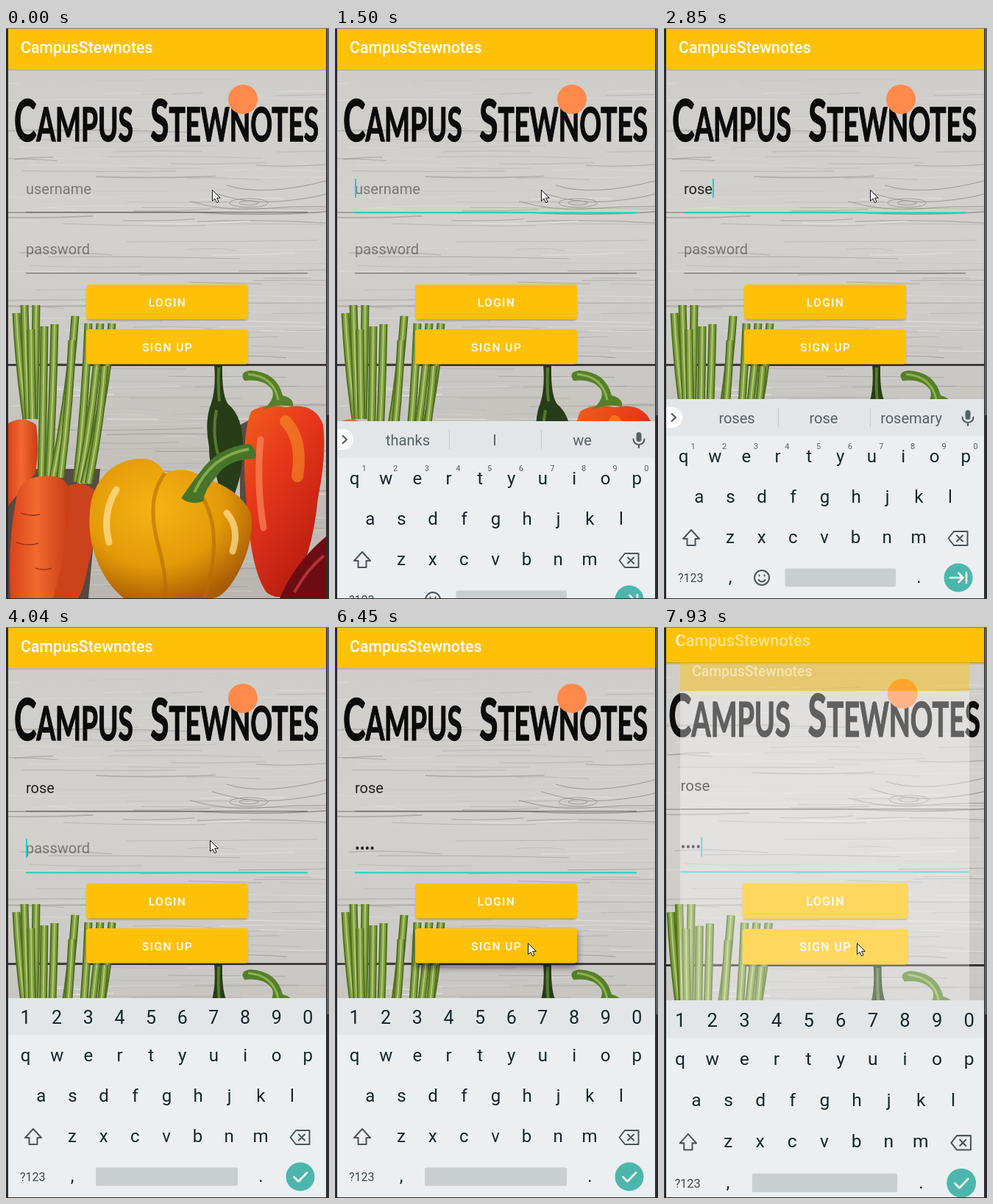
Recreate the animation shown at these times as an HTML page. Size 439 by 777 pixels, loop 8000 ms.

```html
<!DOCTYPE html>
<html lang="en">
<head>
<meta charset="utf-8">
<title>Login screen</title>
<style>
html, body { margin: 0; width: 100%; height: 100%; overflow: hidden; background: #2b2d31; }
svg { display: block; width: 439px; height: 777px; }
text { font-family: Roboto, sans-serif; white-space: pre; }
.mid { text-anchor: middle; }
.bar { font-size: 21.3px; font-weight: 500; fill: #fff; }
.logo { font: 700 37px Lato, sans-serif; stroke: #0b0b0b; stroke-width: .9; fill: #0b0b0b; }
.logo .cap { font-size: 46px; }
.field { font-size: 20px; fill: #222; }
.hint { fill: #000; fill-opacity: .42; }
.btn { font-size: 15.5px; font-weight: 500; letter-spacing: 1.4px; fill: #fff; text-anchor: middle; }
.key { font-size: 24px; fill: #14262c; text-anchor: middle; }
.digit { font-size: 25px; }
.sup { font-size: 11px; fill: #566166; text-anchor: middle; }
.word { font-size: 20px; fill: #566166; text-anchor: middle; }
.icon { fill: none; stroke: #4a555a; stroke-width: 2; stroke-linejoin: round; stroke-linecap: round; }
.go { stroke: #fff; stroke-width: 2.6; }
</style>
</head>
<body>
<svg viewBox="0 0 439 777">
  <defs>
    <clipPath id="screen"><rect x="3" y="1" width="432" height="775"/></clipPath>
    <linearGradient id="wood" x2="0" y2="1">
      <stop offset="0" stop-color="#cfcdca"/><stop offset=".3" stop-color="#d3d1ce"/>
      <stop offset=".55" stop-color="#cbc9c5"/><stop offset="1" stop-color="#b9b5b0"/>
    </linearGradient>
    <linearGradient id="carrot">
      <stop offset="0" stop-color="#d8431a"/><stop offset=".45" stop-color="#f26a30"/><stop offset="1" stop-color="#c93c14"/>
    </linearGradient>
    <radialGradient id="yellow" cx=".4" cy=".35" r=".7">
      <stop offset="0" stop-color="#f6b414"/><stop offset=".6" stop-color="#e39a08"/><stop offset="1" stop-color="#a85c04"/>
    </radialGradient>
    <linearGradient id="red" x2=".6" y2="1">
      <stop offset="0" stop-color="#f0601c"/><stop offset=".4" stop-color="#e8381a"/><stop offset="1" stop-color="#b81c10"/>
    </linearGradient>
    <filter id="soft" x="-20%" y="-60%" width="140%" height="220%"><feGaussianBlur stdDeviation="1.5"/></filter>
    <filter id="wide" x="-20%" y="-60%" width="140%" height="220%"><feGaussianBlur stdDeviation="4.5"/></filter>
  </defs>

  <rect width="439" height="777" fill="#2b2d31"/>
  <rect x="436" width="3" height="527" fill="#5b5e63"/>
  <rect width="439" height="1" fill="#77797c"/>

  <g clip-path="url(#screen)">
    <g id="win">
      <rect x="3" y="56" width="432" height="720" fill="url(#wood)"/>
      <g id="grain" fill="none"></g>
      <g fill="none" stroke="#77736e" opacity=".6">
        <path d="M250 236Q300 250 345 246T435 243M280 224Q330 240 372 236T435 226M300 214Q350 230 435 208"/>
        <ellipse cx="330" cy="238" rx="26" ry="6"/><ellipse cx="330" cy="238" rx="13" ry="3"/>
        <path d="M3 251H260Q350 256 435 250" stroke="#6a6662" stroke-width="1.3"/>
      </g>
      <path d="M3 458.5H435" stroke="#2a2624" stroke-width="2.6"/>

      <!-- vegetables -->
      <path d="M3 600H128L112 776H3ZM318 540L338 530V700L318 660Z" fill="#2c1a12" opacity=".7"/>
      <path d="M3 538Q24 526 41 540Q46 570 40 606L3 650Z" fill="url(#carrot)"/>
      <path d="M82 624Q104 614 122 630Q124 690 112 730Q106 764 98 776H60Q86 700 82 624Z" fill="#cc421b"/>
      <g id="stems" fill="none" stroke-linecap="butt"></g>
      <path d="M14 640Q18 612 48 610Q80 606 86 628Q86 700 64 776H6Q2 700 14 640Z" fill="url(#carrot)"/>
      <path d="M20 660q14 5 26 2M14 700q16 6 30 1M40 735q12 4 22 0" fill="none" stroke="#a9320f" stroke-width="1.5"/>

      <path d="M283 458H294Q293 500 302 512Q322 528 322 570Q322 610 308 640Q292 640 286 610Q276 600 276 570Q270 540 277 516Q286 494 283 458Z" fill="#263d17"/>
      <path d="M286 520Q280 550 288 580M289 462Q288 490 290 508" fill="none" stroke="#57792f" stroke-width="4"/>

      <path d="M333 522Q350 510 380 516Q420 508 431 540Q436 580 424 640Q416 720 388 765Q374 782 354 768Q334 740 328 660Q318 560 333 522Z" fill="url(#red)"/>
      <path d="M346 560Q340 620 350 680" fill="none" stroke="#f9875a" stroke-width="9" stroke-linecap="round" opacity=".7"/>
      <path d="M380 535Q404 560 396 610" fill="none" stroke="#f79a28" stroke-width="16" stroke-linecap="round" opacity=".55"/>
      <path d="M350 519Q366 505 362 493Q352 477 324 480Q316 468 332 466Q368 468 376 500Q392 504 390 515Q370 511 350 519Z" fill="#55802a"/>
      <path d="M329 471Q364 474 370 506" fill="none" stroke="#8fb04d" stroke-width="3"/>
      <path d="M372 776Q392 728 435 692V776Z" fill="#6d0d12"/>
      <path d="M392 768Q408 738 432 718" fill="none" stroke="#b0343a" stroke-width="4"/>

      <path d="M216 606Q244 594 268 612Q316 626 333 660Q338 700 314 744Q296 776 280 776H160Q128 750 116 700Q108 650 124 622Q146 584 190 586Q208 590 216 606Z" fill="url(#yellow)"/>
      <path d="M216 606Q190 640 206 700T214 776M268 640Q296 690 270 776" fill="none" stroke="#b56c05" stroke-width="5" opacity=".6"/>
      <path d="M150 628Q130 660 140 700M300 660Q318 680 308 712" fill="none" stroke="#ffe49a" stroke-width="9" stroke-linecap="round" opacity=".7"/>
      <path d="M238 640Q250 622 264 604Q288 570 330 566Q342 572 339 586Q302 586 286 610Q270 628 268 644Q252 650 238 640Z" fill="#48742a"/>
      <path d="M256 632Q278 582 330 573" fill="none" stroke="#86a94a" stroke-width="4"/>

      <rect x="3" width="432" height="56" fill="#ffc107"/>
      <rect x="3" y="56" width="432" height="2" fill="#000" opacity=".12"/>
      <text class="bar" x="20" y="34">CampusStewnotes</text>
      <g class="logo" transform="translate(0 154) scale(1 1.72)">
        <text class="logo" x="11"><tspan class="cap">C</tspan>AMPUS</text>
        <text class="logo" x="425" text-anchor="end"><tspan class="cap">S</tspan>TEWNOTES</text>
      </g>
      <circle cx="322" cy="97" r="20" fill="#ff8a4c"/>

      <rect id="line0" x="27" width="383"/>
      <rect id="line1" x="27" width="383"/>
      <text id="user" class="field" x="27" y="226"></text>
      <text id="pass" class="field" x="27" y="308"></text>
      <rect id="caret" width="2" height="26" fill="#10d5c0"/>

      <rect x="110" y="351" width="218" height="47" rx="4" opacity=".3" filter="url(#soft)"/>
      <rect x="110" y="412" width="218" height="47" rx="4" opacity=".3" filter="url(#soft)"/>
      <rect id="press" x="108" y="415" width="222" height="49" rx="5" filter="url(#wide)"/>
      <rect x="109" y="349" width="220" height="47.500" rx="4" fill="#ffc107"/>
      <rect x="109" y="410" width="220" height="47.500" rx="4" fill="#ffc107"/>
      <text class="btn" x="219.500" y="379">LOGIN</text>
      <text class="btn" x="219.500" y="439.500">SIGN UP</text>
    </g>

    <g id="veil">
      <rect x="22" width="393" height="87" fill="#ffc107" opacity=".47"/>
      <rect x="22" y="87" width="393" height="689" fill="#fff" opacity=".35"/>
      <text class="bar" style="font-size:19.4px" x="38" y="67" opacity=".5">CampusStewnotes</text>
    </g>

    <g id="kb">
      <rect x="3" y="505" width="432" height="272" fill="#eceff1"/>
      <rect x="3" y="505" width="432" height="50" fill="#e3e6e9"/>
      <g id="keys"></g>
      <g id="textMode">
        <path d="M3 516H11A14 14 0 0 1 11 544H3Z" fill="#fff"/>
        <path class="icon" d="M10.500 525L16 530L10.500 535"/>
        <path d="M155.500 517V543M280.500 517V543" stroke="#c3c8cb"/>
        <rect x="409.500" y="520" width="7" height="13" rx="3.500" fill="#566166"/>
        <path class="icon" d="M405.500 529.500A7.500 7.500 0 0 0 420.500 529.500M413 537V541"/>
        <circle class="icon" cx="133" cy="748" r="10"/>
        <path class="icon" d="M128.500 751Q133 756 137.500 751M129.500 744.500V745.500M136.500 744.500V745.500"/>
      </g>
      <g id="digitMode"></g>
      <rect id="space" y="735.500" height="25" rx="2" fill="#c9ced1"/>
      <path class="icon" d="M37 683L48 695H42.500V704H31.500V695H26Z"/>
      <path class="icon" d="M386.500 694.500L394 685H412.500V704H394ZM398 690.500L406 698.500M406 690.500L398 698.500"/>
      <text x="19" y="754" font-size="16" fill="#3d494e">?123</text>
      <circle cx="400" cy="748" r="19.500" fill="#4db6ac"/>
      <path class="icon go" id="go"/>
    </g>
  </g>
  <path id="mouse" d="M.5 .5V15.500L4 12.300L6.500 17.700L9 16.500L6.600 11.300H11.300Z" fill="#fff" stroke="#111"/>
</svg>

<script>
const LOOP = 8000, TEAL = '#1fd3bf';
const $ = id => document.getElementById(id);

function add(parent, tag, attrs, label) {
  const el = document.createElementNS('http://www.w3.org/2000/svg', tag);
  for (const k in attrs) el.setAttribute(k, attrs[k]);
  if (label) el.textContent = label;
  return parent.appendChild(el);
}
function set(id, attrs) {
  for (const k in attrs) $(id).setAttribute(k, attrs[k]);
}
const show = (id, on) => set(id, { visibility: on ? 'visible' : 'hidden' });

// wood grain
let seed = 11;
const rnd = () => (seed = seed * 16807 % 2147483647) / 2147483647;
for (let i = 0; i < 190; i++) {
  const x = rnd() * 420 - 40, y = 62 + rnd() * 710, len = 50 + rnd() * 220;
  add($('grain'), 'path', {
    d: `M${x} ${y}q${len / 2} ${rnd() * 8 - 4} ${len} ${rnd() * 6 - 3}`,
    stroke: rnd() < .55 ? '#85817c' : '#f1f0ee',
    'stroke-width': .5 + rnd() * 1.3, opacity: .15 + rnd() * .35
  });
}

// carrot tops: top point, foot point
const stems = [
  [14, 388, 28, 532], [25, 377, 31, 532], [41, 377, 38, 532], [34, 410, 36, 532],
  [112, 402, 96, 618], [128, 402, 100, 620], [144, 402, 106, 620], [134, 460, 112, 620],
  [52, 406, 48, 612], [66, 403, 58, 612], [94, 392, 64, 612], [90, 425, 74, 612]
];
for (const [x, y, fx, fy] of stems) {
  const d = `M${x} ${y}Q${x * .75 + fx * .25} ${(y + fy) / 2} ${fx} ${fy}`;
  add($('stems'), 'path', { d, stroke: '#4f6f22', 'stroke-width': 11 });
  add($('stems'), 'path', { d, stroke: '#7f9f3c', 'stroke-width': 7 });
  add($('stems'), 'path', { d, stroke: '#b3c878', 'stroke-width': 2 });
}

// keyboard
const PITCH = 42.65;
function keyRow(chars, x, y, parent = $('keys'), cls = 'key') {
  [...chars].forEach((c, i) => add(parent, 'text', { class: cls, x: x + i * PITCH, y }, c));
}
keyRow('qwertyuiop', 26.5, 591);
keyRow('asdfghjkl', 47.8, 646);
keyRow('zxcvbnm', 90, 701);
keyRow(',', 90, 755);
keyRow('.', 346.5, 755);
keyRow('1234567890', 39.5, 573, $('textMode'), 'sup');
keyRow('1234567890', 26.5, 540, $('digitMode'), 'key digit');
const words = [99, 217, 336].map(x => add($('textMode'), 'text', { class: 'word', x, y: 538 }));

// each track: [time, value], held until the next entry
const tracks = {
  user: [[0, ''], [2480, 'ro'], [2730, 'ros'], [2850, 'rose']],
  pass: [[0, ''], [4580, 'r'], [4700, '•o'], [4850, '••s'], [5000, '•••e'], [6450, '••••']],
  focus: [[0, -1], [1200, 0], [3790, 1]],
  caret: [[0, 0], [1200, 1], [1770, 0], [2330, 1], [3380, 0], [3790, 1], [5520, 0],
          [6060, 1], [6450, 0], [6970, 1], [7380, 0], [7930, 1]],
  rise: [[0, 999], [1500, 30], [1650, 0]],
  digits: [[0, false], [3920, true]],
  words: [[0, 'thanks I we'], [2480, 'road room rock'], [2730, 'rose rosy roses'], [2850, 'roses rose rosemary']],
  press: [[0, 0], [6210, .2], [6330, .4], [6600, .2], [6720, 0]],
  zoom: [[0, 1], [7930, 1.023]],
  mouse: [[0, [280, 220]], [3520, [279, 250]], [3650, [278, 283]], [3790, [277, 290]],
          [5400, [275, 350]], [5520, [270, 409]], [5670, [268, 423]], [5790, [266, 431]],
          [5940, [264, 431]], [6060, [262, 430]]]
};
const at = (name, t) => tracks[name].filter(e => e[0] <= t).pop()[1];

function fill(id, value, hint) {
  $(id).textContent = value || hint;
  $(id).classList.toggle('hint', !value);
  return value ? $(id).getComputedTextLength() : 0;
}

function draw(t) {
  const focus = at('focus', t), digits = at('digits', t), zoom = at('zoom', t);
  const widths = [fill('user', at('user', t), 'username'), fill('pass', at('pass', t), 'password')];
  [250, 333].forEach((y, i) => set('line' + i, focus === i
    ? { y: y + .3, height: 2, fill: TEAL }
    : { y: y + .2, height: 1, fill: '#605f5d' }));
  set('caret', { x: 27 + (widths[focus] || 0), y: focus ? 288 : 205 });
  show('caret', at('caret', t));
  set('press', { opacity: at('press', t) });

  show('textMode', !digits);
  show('digitMode', digits);
  at('words', t).split(' ').forEach((w, i) => words[i].textContent = w);
  set('space', digits ? { x: 122, width: 193 } : { x: 164.5, width: 150.5 });
  set('go', { d: digits ? 'M391.500 748.500L397.500 754.500L409 742.500' : 'M389 748H406M400.500 742L406.500 748L400.500 754M411 741V755' });

  const scale = `translate(219 375) scale(${zoom}) translate(-219 -375)`;
  set('win', { transform: scale });
  set('kb', { transform: `${scale} translate(0 ${at('rise', t)})` });
  show('veil', zoom > 1);
  set('mouse', { transform: `translate(${at('mouse', t)})` });
}

function tick() {
  draw(performance.now() % LOOP);
  requestAnimationFrame(tick);
}
tick();
</script>
</body>
</html>
```
